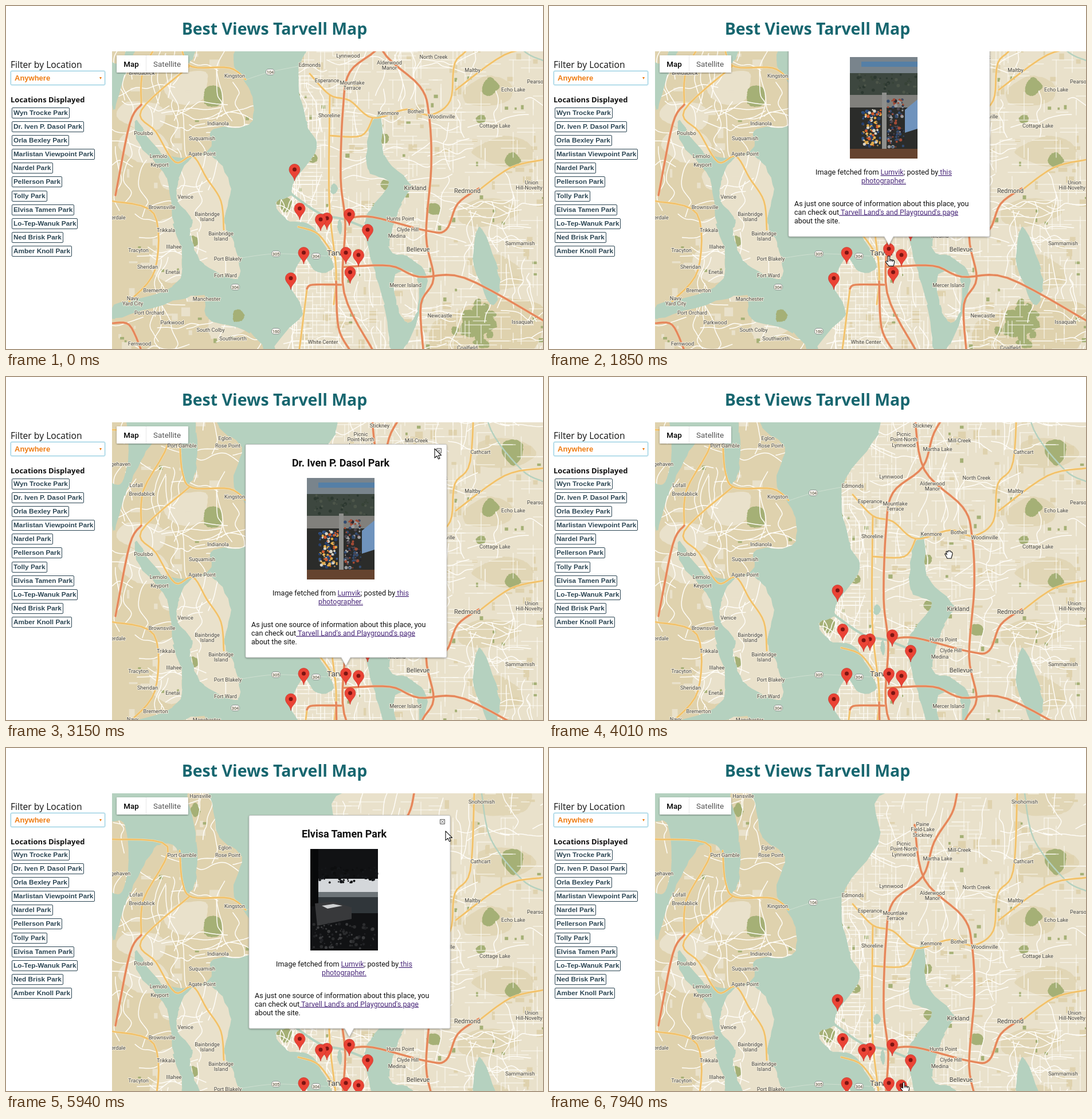
An HTML page for the animation above (8000 ms loop, 937 by 598 pixels).

```html
<!DOCTYPE html>
<html lang="en">
<head>
<meta charset="utf-8">
<title>Best Views Tarvell Map</title>
<style>
html, body { margin: 0; width: 100%; height: 100%; overflow: hidden; background: #fff; }
body { position: relative; }
h1, h2, p, ul, .select { position: absolute; margin: 0; white-space: nowrap; }
h1 { left: 0; width: 937px; top: 19px; text-align: center; font: bold 28.5px/40px "Open Sans", sans-serif; color: #17666f; }
p { left: 8px; top: 91px; font: 15.7px/22px "Open Sans", sans-serif; color: #111; }
h2 { left: 8px; top: 153px; font: bold 13px/20px "Open Sans", sans-serif; color: #111; }
.select { left: 8px; top: 113px; width: 157px; height: 23px; padding-left: 6px; border: 1px solid #8cc9dd; border-radius: 2px;
  box-shadow: 0 0 2px #9bd3e6; font: bold 13px/23px "Liberation Sans", Arial, sans-serif; color: #ee7b11; }
.select::after { content: ""; position: absolute; right: 5px; top: 10px; border: 2.5px solid transparent; border-top: 4px solid #ee7b11; }
ul { left: 10px; top: 177px; padding: 0; list-style: none; }
li { height: 24.1px; }
li span { display: inline-block; height: 17px; padding: 0 2px; border: 1px solid #2b4553; border-radius: 2px;
  font: bold 11.8px/17px "Liberation Sans", Arial, sans-serif; color: #2b4553; vertical-align: top; }
svg { position: absolute; left: 185px; top: 79px; overflow: hidden; }
text { font-family: Roboto, sans-serif; white-space: pre; }
#labels text { text-anchor: middle; fill: #45443f; stroke: #f5efdf; stroke-width: 2px; stroke-linejoin: round; paint-order: stroke; }
#popups text { font-size: 12.6px; fill: #111; }
#popups .mid { text-anchor: middle; }
#popups .head { font-size: 18px; font-weight: bold; }
#popups .link { fill: #4b2a7b; text-decoration: underline; }
.road { fill: none; stroke-linecap: round; stroke-linejoin: round; }
</style>
</head>
<body>
<h1>Best Views Tarvell Map</h1>
<p>Filter by Location</p>
<div class="select">Anywhere</div>
<h2>Locations Displayed</h2>
<ul id="list"></ul>
<svg width="752" height="519" viewBox="185 79 752 519">
  <defs>
    <clipPath id="land"><path id="landClip" clip-rule="evenodd"/></clipPath>
    <filter id="shadow" x="-10%" y="-10%" width="120%" height="120%"><feDropShadow dx="0" dy="1" stdDeviation="1.5" flood-opacity=".4"/></filter>
  </defs>
  <rect x="185" y="79" width="752" height="519" fill="#b5d1bf"/>
  <g id="map">
    <g id="ground"></g>
    <g id="labels"></g>
    <g id="pins"></g>
  </g>
  <g id="popups"></g>
  <rect x="193" y="86" width="125" height="30" rx="1" fill="#fff" filter="url(#shadow)"/>
  <path d="M244.5 86v30" stroke="#e8e8e8"/>
  <text x="218.5" y="106" text-anchor="middle" font-size="13.3" font-weight="500">Map</text>
  <text x="281" y="106" text-anchor="middle" font-size="13.4" fill="#565656">Satellite</text>
  <g id="cursor" fill="#fff" stroke="#111" stroke-width="1.1" stroke-linejoin="round">
    <path id="arrow" d="M0 0V16L4 12.5 6.500 18 9 17 6.500 11.500H11.500Z"/>
    <path id="point" d="M-1.500 1Q0-1.500 1.500 1V6L8 7.500Q10 8 9.500 12L8 17.500H0L-5.500 10.500Q-5 7.500-1.500 10ZM1.500 6V9M4 7V9.500M6.500 7.500V10"/>
    <path id="grab" d="M-3 7L-7-.5Q-6-2.500-3.500.5L-5-4.500Q-3-6.500-2-3.500-2-8 .5-5.500 2.500-7.500 3.500-4 6.500-5 6 0L4 7Z"/>
  </g>
</svg>
<script>
const $ = id => document.getElementById(id);
const tan = '#dfd2ae', cream = '#e9e1cb', olive = '#a5b076', water = '#b5d1bf';
let seed = 11;
const rnd = (a = 0, b = 1) => {
  seed = (seed * 16807) % 2147483647;
  return a + (b - a) * seed / 2147483647;
};
const pick = list => list[Math.floor(rnd(0, list.length))];
const times = (n, make) => Array.from({ length: n }, (_, i) => make(i)).join('');
const points = s => s.split(' ').map(p => p.split(',').map(Number));
const add = (id, html) => $(id).insertAdjacentHTML('beforeend', html);

// Smooth line through points, optionally closed and ragged
function trace(pts, closed = false, rough = 0) {
  const n = pts.length, out = [];
  const at = i => pts[closed ? (i + n) % n : Math.max(0, Math.min(n - 1, i))];
  for (let i = 0; i < (closed ? n : n - 1); i++)
    for (let k = 0; k < 1; k += 1 / 6)
      out.push([0, 1].map(c => {
        const [a, b, d, e] = [-1, 0, 1, 2].map(j => at(i + j)[c]);
        const v = b + k * (d - a + k * (2 * a - 5 * b + 4 * d - e + k * (3 * (b - d) + e - a))) / 2;
        return (v + rnd(-rough, rough)).toFixed(1);
      }));
  if (!closed) out.push(at(n - 1));
  return 'M' + out.join('L') + (closed ? 'Z' : '');
}
const shore = s => trace(points(s), true, 1.6);
const blob = (x, y, w, h) => trace(Array.from({ length: 8 }, (_, i) => {
  const a = i * Math.PI / 4, r = rnd(.8, 1.25);
  return [x + w * r * Math.cos(a), y + h * r * Math.sin(a)];
}), true, .6);
const fill = (d, color, extra = '') => `<path d="${d}" fill="${color}" ${extra}/>`;
const road = (d, color, width) => `<path class="road" d="${d}" stroke="${color}" stroke-width="${width}"/>`;

// Land
const west = shore('180,200 190,180 208,120 240,50 268,14 300,25 312,95 330,80 332,10 318,-80 352,-80 372,0 412,36 396,96 427,150 425,206 362,214 355,248 318,264 270,255 228,200 232,240 280,300 292,380 308,440 290,490 190,522 190,545 290,515 345,505 352,545 425,570 430,610 180,610');
const canal = blob(190, 40, 20, 70);
const island = shore('325,264 366,266 392,320 380,375 400,420 405,475 345,450 322,400 325,372 300,340 302,300');
const east = shore('600,-80 575,11 512,105 524,200 542,248 500,310 500,330 470,343 490,372 535,386 572,455 540,462 520,438 498,486 518,535 494,615 945,615 945,-80');
const lakes = shore('655,190 634,215 632,285 668,308 640,350 626,380 640,450 660,520 672,600 700,590 735,480 705,440 668,420 690,345 705,310 660,260')
  + shore('828,385 858,460 860,500 845,520 815,440')
  + shore('680,468 716,470 718,530 700,552 682,520');
$('landClip').setAttribute('d', west + canal + island + east + lakes);

// Patches, woods and parks
let inland = times(9, i => fill(blob(rnd(220, 400), 140 + i * 52, 38, 28), cream))
  + times(7, i => fill(blob(rnd(780, 930), -60 + i * 105, 50, 26), tan, 'opacity=".7"'))
  + fill(blob(845, 570, 100, 55), tan);
const specks = (n, color, max, x0, x1) => times(n, () =>
  `<rect x="${rnd(x0, x1)}" y="${rnd(-75, 598)}" width="${rnd(3, max)}" height="${rnd(3, max)}" fill="${color}"/>`);
inland += specks(110, tan, 16, 500, 937) + specks(60, cream, 20, 185, 420) + specks(55, olive, 8, 500, 937) + specks(14, olive, 8, 185, 420);
for (const [x, y, r] of points('361,157,17 844,141,14 885,270,13 747,354,11 885,44,20 330,-46,10 660,230,9 663,312,9 487,344,13 325,410,9 536,264,8 828,198,8'))
  inland += fill(blob(x, y, r, r), olive);
inland += times(45, () => fill(blob(825 + rnd(-1, 1) * rnd(0, 45), 555 + rnd(-1, 1) * rnd(0, 40), rnd(4, 12), rnd(4, 12)), olive));

// City streets, denser toward the shore, then wandering country roads
const streets = times(1000, () => {
  const x = 500 + Math.round(430 * rnd() ** 2.2 / 7) * 7, y = 598 - Math.round(670 * rnd() ** 1.3 / 7) * 7;
  return `M${x} ${y}${pick('hv')}${rnd(14, 50).toFixed(1)}`;
});
const lanes = times(230, () => {
  let x = rnd(185, 937), y = rnd(-75, 598);
  const dir = Math.floor(rnd(0, 4)) * Math.PI / 2, pts = [[x, y]];
  for (let k = 0; k < 5; k++) {
    const a = dir + rnd(-.6, .6), r = rnd(10, 30);
    pts.push([x += r * Math.cos(a), y += r * Math.sin(a)]);
  }
  return trace(pts);
});
const line = (s, color, width) => road(trace(points(s)), color, width);
let ground = fill(west + canal, tan) + fill(island, cream) + fill(east + lakes, cream, 'fill-rule="evenodd"')
  + `<g clip-path="url(#land)">${inland}${road(streets, '#fcfaf3', 1)}${road(lanes, '#fffdf8', 1.5)}</g>`
  + line('498,328 548,362 590,372 635,390', water, 4) + line('830,-75 846,5 900,75 937,95', water, 2.5)
  + fill(blob(572, 318, 6, 8) + blob(583, 385, 4, 11), water) + fill(blob(405, 540, 9, 11), olive)
  + line('420,128 461,115 510,105', '#cfdfd0', 1) + line('405,440 471,432 560,436', '#cfdfd0', 1);

// Main roads
const yellow = [
  '185,5 282,18 240,110 236,170', '303,25 308,80 325,106 390,108 418,128', '320,105 236,182 262,220 295,272 326,262 350,300 375,340 380,390',
  '185,340 258,362 260,460 215,515', '817,-75 810,60 783,100 775,165 740,190 700,180 640,195 600,165 565,155 530,118', '937,72 870,85 785,146',
  '565,155 564,340 576,460 572,520', '565,226 620,226 640,195', '937,268 880,282 820,325', '525,495 512,598', '510,385 545,398 575,440'];
const orange = [
  '712,-75 703,-40 672,10 652,70 600,115 588,180 584,300 592,380 590,500 640,600', '638,-20 655,75 722,140 738,190 742,280 733,400 746,475 724,520 728,600',
  '598,370 640,368 735,392 768,390 788,345 825,318', '590,455 670,453 720,472 800,474 937,548', '236,172 216,205 191,330', '185,553 215,556 236,600', '525,493 535,486 585,486', '576,480 580,560 600,600'];
const roads = (set, edge, color, width) =>
  set.map(s => line(s, edge, width + 1)).join('') + set.map(s => line(s, color, width)).join('');
add('ground', ground + roads(yellow, '#f8e2b0', '#f1c069', 2.6) + roads(orange, '#f3c7a4', '#e5865a', 3.2));

// Labels: text,x,y; "|" breaks a line, "*" marks a town, "#" a route shield
const labels = `Hansville,339,-70;Port Gamble,307,33;Eglon,382,20;Rose Point,387,33;gehaven,200,65;Lofall,227,102;Breidablick,237,117
Paine|Field-Lake|Stickney,652,-21;Picnic|Point-North|Lynnwood,619,13;Martha Lake,678,39;Mill-Creek,716,24;Snohomish,830,-60;Cathcart,828,44
Kingston,399,122;Edmonds,530,103;Lynnwood,597,87;Alderwood|Manor,669,99;North Creek,746,89;Maltby,814,112;Echo Lake,885,146;Pearson,926,132
Esperance,560,130;Mountlake|Terrace,604,134;Shoreline,564,191;Kenmore,667,187;Bothell,715,184;Woodinville,760,193;Cottage Lake,853,209
Indianola,370,205;Poulsbo,240,222;Suquamish,342,231;Agate Point,342,258;Lemolo,266,262;Keyport,268,277;Venice,313,333;Brownsville,272,351
Bainbridge|Island,351,363;Bainbridge|Island,375,397;erdale,196,369;Trikkala,279,391;Illahee,293,420;Tracyton,231,426;Sheridan,247,455;Enetai,291,464
Port Blakely,387,441;Fort Ward,383,470;Bremerton,261,496;Navy|Yard City,221,510;Manchester,350,511;Port Orchard,250,535;Parkwood,290,552
South Colby,357,565;Southworth,396,580;Fernwood,233,589;*Kirkland,714,317;*Redmond,805,322;Union|Hill-Novelty H,917,308
Hunts Point,688,371;Clyde Hill,701,390;Medina,682,401;*Bellevue,719,424;Sammamish,897,414;Mercer Island,697,487;Newcastle,757,540
Issaquah,901,551;Coalfield,805,596;White Center,553,586;**Tarvell,580,430`;
for (const item of labels.split(/[;\n]/)) {
  const [text, x, y] = item.split(',');
  const size = [9.2, 10.8, 13.6][text.lastIndexOf('*') + 1];
  text.replace(/\*/g, '').split('|').forEach((row, i) =>
    add('labels', `<text x="${x}" y="${+y + size / 3 + i * 9.3}" font-size="${size}">${row}</text>`));
}
for (const [n, x, y] of points('104,461,115 305,471,432 304,541,436 304,400,490 160,471,567'))
  add('labels', `<rect x="${x - 7.5}" y="${y - 5}" width="15" height="10" rx="4.5" fill="#fff" stroke="#777" stroke-width=".8"/>
    <text x="${x}" y="${y + 2.8}" font-size="7.5">${n}</text>`);

// Pins
const spots = points('503.5,285 512.5,353 599,363 560,370 549,372 631,390 519.5,430 593,430 615,434 600.5,464 497,474.5');
for (const [x, y] of spots)
  add('pins', `<g transform="translate(${x} ${y})"><path d="M0 20C-1 11-9.500 8-9.500 0A9.500 9.500 0 0 1 9.500 0C9.500 8 1 11 0 20Z" fill="#ea4335" stroke="#c5352b" stroke-width=".7"/>
    <circle r="3.5" fill="#7c1512"/></g>`);
const pins = [...$('pins').children];

// Popups, laid out where they rest after the map has moved
const box = (x, y, w, h, color) => `<rect x="${x}" y="${y}" width="${w}" height="${h}" fill="${color}"/>`;
const dots = (n, colors, x, y, w, h) => times(n, () =>
  `<circle cx="${rnd(x, x + w)}" cy="${rnd(y, y + h)}" r="${rnd(1, 3)}" fill="${pick(colors)}"/>`);
const mural = box(0, 0, 118, 177, '#79848c') + box(20, 8, 98, 9, '#557fa6') + box(0, 28, 118, 38, '#3d473f')
  + dots(50, ['#2c3830', '#4c5549', '#364236'], 2, 30, 114, 34) + box(0, 66, 118, 22, '#81807c') + box(0, 88, 118, 74, '#2b2c2a')
  + dots(110, ['#d8d3c5', '#cf5a2b', '#34588f', '#27406e', '#e2ab4b'], 22, 92, 32, 66)
  + dots(110, ['#a24a35', '#9b9da0', '#334b70', '#25242b', '#4c4852'], 66, 74, 28, 84) + box(56, 62, 8, 102, '#8e8f8c')
  + fill('M96 92L118 74V125L96 132Z', '#6f93bd') + box(0, 160, 118, 17, '#65432f');
const dusk = box(0, 0, 118, 177, '#111214') + box(14, 52, 104, 24, '#d4d7da') + box(14, 75, 104, 9, '#6d7478') + box(14, 84, 104, 28, '#30363a')
  + dots(70, ['#0d0e0f', '#15171a'], 10, 32, 108, 27) + box(0, 0, 14, 100, '#08090a') + fill('M8 95L40 92 72 102V122L12 134Z', '#38393b')
  + fill('M20 99L40 96 56 99 30 104Z', '#cfd1d2') + dots(90, ['#2b2c2e', '#202124', '#3b3c3e'], 5, 130, 108, 44);
const link = text => `<tspan class="link">${text}</tspan>`;
function popup(id, title, photo) {
  add('popups', `<g id="${id}"><path d="M420 117.5H767Q769 117.5 769 119.5V487Q769 489 767 489H601L593 504 585 489H420Q418 489 418 487V119.5Q418 117.5 420 117.5Z" fill="#fff" stroke="#b5b5b5" stroke-width=".7" filter="url(#shadow)"/>
    <path d="M751.5 124.5h8v8h-8zM753 126l5 5m0-5l-5 5" fill="none" stroke="#555"/>
    <text class="mid head" x="584" y="156">${title}</text>
    <svg x="525" y="176" width="118.5" height="177">${photo}</svg>
    <text class="mid" x="584" y="381">Image fetched from ${link('Lumvik')}; posted by${link(' this')}</text>
    <text class="mid" x="584" y="396">${link('photographer.')}</text>
    <text x="428" y="435.5">As just one source of information about this place, you</text>
    <text x="428" y="450.5">can check out${link(" Tarvell Land's and Playground's page")}</text>
    <text x="428" y="465.5">about the site.</text></g>`);
}
popup('first', 'Dr. Iven P. Dasol Park', mural);
popup('second', 'Elvisa Tamen Park', dusk);

for (const name of ['Wyn Trocke', 'Dr. Iven P. Dasol', 'Orla Bexley', 'Marlistan Viewpoint', 'Nardel', 'Pellerson', 'Tolly', 'Elvisa Tamen',
  'Lo-Tep-Wanuk', 'Ned Brisk', 'Amber Knoll'])
  add('list', `<li><span>${name} Park</span></li>`);

// Cursor stops: time, x, y, shape from then on
const stops = [
  [220, 843, 582, 'grab'], [1080, 593, 435, 'point'], [1930, 593, 436, 'arrow'], [2080, 593, 436, 'arrow'],
  [2620, 767, 167, 'arrow'], [3150, 748, 125, 'arrow'], [3400, 750, 126, 'grab'], [3700, 750, 128, 'grab'], [4010, 698, 309, 'grab'],
  [4620, 599, 446, 'point'], [5400, 599, 446, 'arrow'], [5940, 767, 145, 'arrow'], [6090, 770, 128, 'arrow'], [6300, 770, 128, 'arrow'],
  [6550, 757, 124, 'arrow'], [6720, 760, 131, 'grab'], [7480, 651, 530, 'grab'], [7860, 619, 583, 'point'], [8000, 619, 583, 'point']];
const move = (el, x, y) => el.setAttribute('transform', `translate(${x} ${y})`);
const show = (id, on) => $(id).style.display = on ? '' : 'none';
const hop = t => t > 0 && t < 700 ? -7 * Math.abs(Math.sin(Math.PI * t / 350)) : 0;
// Each visit: popup, pin, time it opens and closes, sideways offset
const visits = [['first', 7, 1700, 3550, 0], ['second', 2, 5180, 6720, 6]];

function draw(now) {
  const t = now % 8000;
  const pan = t < 1930 ? 0 : t < 5400 ? 87 : 154;
  move($('map'), 0, pan);
  visits.forEach(([id, pin, open, close, dx], i) => {
    const [x, y] = spots[pin];
    move(pins[pin], x, y + hop(t - open));
    show(id, t >= open && t < close);
    move($(id), dx, pan - [87, 154][i]);
  });

  show('cursor', t >= 220);
  if (t >= 220) {
    const i = stops.findIndex((s, k) => t < stops[k + 1][0]);
    const [t0, x0, y0, shape] = stops[i], [t1, x1, y1] = stops[i + 1];
    const k = (t - t0) / (t1 - t0);
    move($('cursor'), x0 + (x1 - x0) * k, y0 + (y1 - y0) * k);
    for (const id of ['arrow', 'point', 'grab']) show(id, id === shape);
  }
  requestAnimationFrame(draw);
}
requestAnimationFrame(draw);
</script>
</body>
</html>
```
